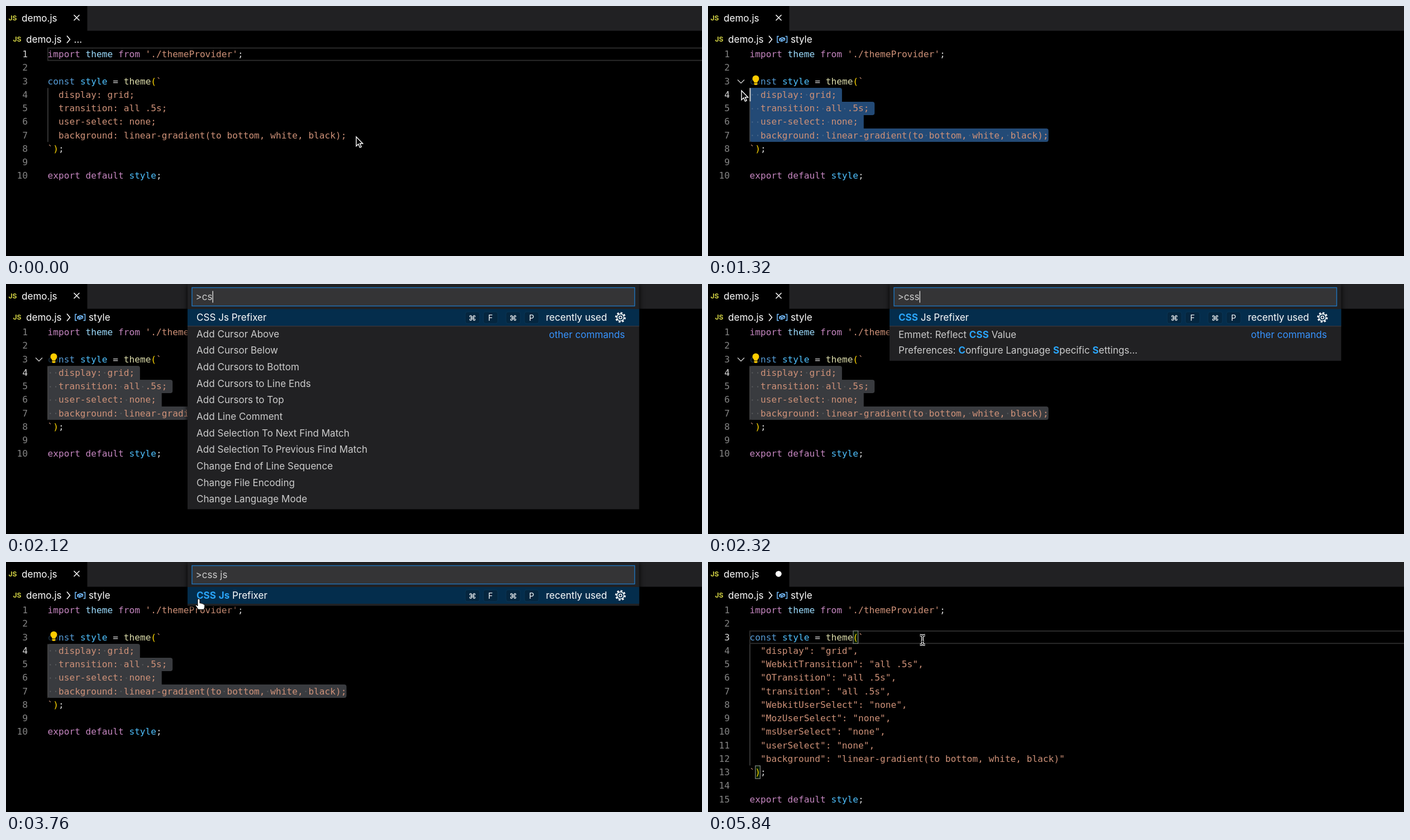
Recreate the animation shown at these times as an HTML page. Size 1246 by 449 pixels, loop 5920 ms.

```html
<!DOCTYPE html>
<html lang="en">
<head>
<meta charset="utf-8">
<title>CSS to JS prefixer demo</title>
<style>
html, body { margin: 0; width: 100%; height: 100%; overflow: hidden; background: #000; }
svg { display: block; width: 100%; height: 100%; }
text { white-space: pre; font: 17.07px Inter, sans-serif; fill: #ccc; }
.code text { font: 16.16px "DejaVu Sans Mono", monospace; fill: #d4d4d4; }
.code .k { fill: #c586c0; }
.code .v { fill: #9cdcfe; }
.code .s { fill: #ce9178; }
.code .c { fill: #569cd6; }
.code .n { fill: #4fc1ff; }
.code .f { fill: #dcdcaa; }
.code .b { fill: #ffd700; }
.code .num { fill: #858585; text-anchor: end; }
.code .num.on { fill: #d8d8d8; }
.w { fill: #fff; }
text.js { font-size: 12.2px; font-weight: 700; fill: #cbcb41; }
.hit { fill: #2aa4f8; font-weight: 700; }
.end { text-anchor: end; }
.key { font-size: 14px; text-anchor: middle; fill: #fff; }
.line { fill: none; stroke: #fff; stroke-width: 1.5; }
#popup { filter: drop-shadow(0 2px 5px #000); }
</style>
</head>
<body>
<svg viewBox="0 0 1246 449">
  <rect width="1246" height="449"/>
  <rect x="145.5" width="1101" height="44.5" fill="#212123"/>
  <text class="js" x="4.5" y="26">JS</text>
  <text class="w" x="28" y="27.5">demo.js</text>
  <path id="close" class="line" d="M121.5 16l10 10m0-10l-10 10"/>
  <circle id="dirty" class="w" cx="126.3" cy="21.3" r="5.4"/>
  <text class="js" x="12.5" y="64">JS</text>
  <text class="w" x="36" y="65.8">demo.js</text>
  <path class="line" d="M109 53.5l5.5 6.5-5.5 6.5" stroke-width="1.4"/>
  <text id="dots" class="w" x="121.5" y="65.8">...</text>
  <g id="crumb">
    <path class="line" style="stroke:#75beff" d="M127 54.5h-3v11h3M138.5 54.5h3v11h-3M128 59l5.5-2.5 4 1.5v3l-5.5 2.5-4-1.5zl4 1.5 5.5-2.5M132 60.5v3"/>
    <text class="w" x="148" y="65.8">style</text>
  </g>
  <g class="code">
    <rect id="current" x="75" width="1180" height="22.2" fill="none" stroke="#2a2a2a" stroke-width="2"/>
    <path id="selection"/>
    <path id="guide" stroke="#484848" stroke-width="1.4"/>
    <path id="spaces" fill="#e3e4e2" opacity=".2"/>
    <g id="brackets" fill="#001a00" stroke="#888" stroke-width="1.2">
      <rect x="260" y="123.8" width="8.6" height="22.6"/>
      <rect x="84.8" y="366" width="8.6" height="23"/>
    </g>
    <g id="before"></g>
    <g id="after"></g>
    <g id="numbers"></g>
  </g>
  <path id="fold" class="line" style="stroke:#c5c5c5" d="M53 132.5l6 6 6-6"/>
  <g id="bulb">
    <rect x="75" y="124" width="20" height="22" opacity=".7"/>
    <path fill="#fc0" d="M82.5 137.5q0-2-1.8-3.4a6 6 0 1 1 9.6 0q-1.8 1.4-1.8 3.4zM82.5 138.5h6v1.8q0 1.4-1.4 1.4h-3.2q-1.4 0-1.4-1.4z"/>
  </g>
  <rect id="caret" width="2" height="24" fill="#c8c8c6"/>
  <g id="popup">
    <rect id="panel" x="325" width="808.5" fill="#212123"/>
    <rect x="333" y="6.5" width="792.5" height="33" fill="#343436" stroke="#1f74bd" stroke-width="1.4"/>
    <text id="hint" x="339.5" y="29" style="fill:#a0a0a0">Search files by name (append : to go to line or @ to go to symbol)</text>
    <text id="query" x="339.5" y="29"></text>
    <rect id="inputCaret" y="12.5" width="1.4" height="21" fill="#ddd"/>
    <rect x="325" y="45" width="808.5" height="30" fill="#042d4c"/>
    <g id="files">
      <text class="js" x="346.5" y="64">JS</text><text class="w" x="370.5" y="66.2">demo.js</text>
      <text class="w end" x="1043" y="66.2">recently opened</text>
      <path class="line" d="M1060 52h16.5v15.5h-16.5zM1068.2 52v15.5M1095 55l10 10m0-10l-10 10"/>
      <text class="js" x="346.5" y="94">JS</text><text x="370.5" y="95.8">test.js</text>
      <text class="js" x="346" y="124" style="font-size:14px">{ }</text><text x="370.5" y="125.5">settings.json</text>
      <text x="482.5" y="125.5" style="font-size:15px;fill:#999">.vscode</text>
    </g>
    <g id="recent">
      <text class="w end" x="1076" y="66.2">recently used</text>
      <circle class="line" cx="1100" cy="60" r="6.3"/>
      <circle class="line" cx="1100" cy="60" r="2.6"/>
      <circle class="line" cx="1100" cy="60" r="8.2" style="stroke-width:2.6" stroke-dasharray="3.22"/>
    </g>
    <g id="other">
      <path d="M325 75.8h808.5" stroke="#3f3f46"/>
      <text class="end" x="1108" y="96.8" style="fill:#3794ff">other commands</text>
    </g>
    <g id="all"></g>
    <g id="css"></g>
    <g id="cssJs"></g>
  </g>
  <g id="mouse">
    <path id="arrow" d="M0 0V16.5l3.8-3.6 2.7 6.2 2.7-1.2-2.7-5.9h5.2z" stroke="#fff" stroke-width="1.4"/>
    <path id="hand" fill="#fff" stroke="#000" d="M-2 1a2 2 0 0 1 4 0v6q2.6-1 3.4.8 2.4-.7 3 1.1 2.4-.2 2.4 1.9v2q0 3-1.8 5.5H-1q-1-2.5-4.5-6.5-.6-2 1.3-1.8L-2 12z"/>
    <g id="beam" fill="none">
      <path stroke="#fff" stroke-width="4"/>
      <path stroke="#000" stroke-width="1.5"/>
    </g>
  </g>
</svg>
<script>
const LOOP = 5920, TICK = 40;
const LEFT = 74.5, TOP = 74.5, CHAR = 9.728, ROW = 24.25, ITEM = 29.63;
const CLICK = 160, SELECTED = 880, OPEN = 1600, RUN = 4280, REPLACED = 4320, DESELECT = 5000;

const $ = id => document.getElementById(id);
const show = (id, on) => { $(id).style.display = on ? '' : 'none'; };
const set = (id, attrs) => { for (const k in attrs) $(id).setAttribute(k, attrs[k]); };
const rowTop = row => TOP + row * ROW;
const colX = col => LEFT + col * CHAR;

const HEAD = [
  [['k', 'import '], ['v', 'theme '], ['k', 'from '], ['s', "'./themeProvider'"], ['', ';']],
  [],
  [['c', 'const '], ['n', 'style '], ['', '= '], ['f', 'theme'], ['b', '('], ['s', '`']]
];
const TAIL = [
  [['s', '`'], ['b', ')'], ['', ';']],
  [],
  [['k', 'export default '], ['n', 'style'], ['', ';']]
];
const withBody = body => [...HEAD, ...body.map(line => [['s', '  ' + line]]), ...TAIL];

const DOCS = {
  before: withBody([
    'display: grid;',
    'transition: all .5s;',
    'user-select: none;',
    'background: linear-gradient(to bottom, white, black);'
  ]),
  after: withBody([
    '"display": "grid",',
    '"WebkitTransition": "all .5s",',
    '"OTransition": "all .5s",',
    '"transition": "all .5s",',
    '"WebkitUserSelect": "none",',
    '"MozUserSelect": "none",',
    '"msUserSelect": "none",',
    '"userSelect": "none",',
    '"background": "linear-gradient(to bottom, white, black)"'
  ])
};
const plain = line => line.map(part => part[1]).join('');

for (const id in DOCS) {
  $(id).innerHTML = DOCS[id].map((line, i) =>
    `<text x="${LEFT}" y="${rowTop(i) + 17.7}">` +
    line.map(([cls, s]) => `<tspan class="${cls}">${s}</tspan>`).join('') + '</text>').join('');
}
$('numbers').innerHTML = DOCS.after.map((_, i) =>
  `<text class="num" x="39" y="${rowTop(i) + 17.7}">${i + 1}</text>`).join('');

// Square brackets mark the matched letters of a command.
const commands = (list, nudge = 0) => list.map((name, i) =>
  `<text class="${i ? '' : 'w'}" x="341" y="${66.2 + i * ITEM + (i === 1 ? nudge : 0)}">` +
  name.replace(/\[(.*?)\]/g, '<tspan class="hit">$1</tspan>') + '</text>').join('');
$('all').innerHTML = commands(['CSS Js Prefixer', 'Add Cursor Above', 'Add Cursor Below',
  'Add Cursors to Bottom', 'Add Cursors to Line Ends', 'Add Cursors to Top', 'Add Line Comment',
  'Add Selection To Next Find Match', 'Add Selection To Previous Find Match',
  'Change End of Line Sequence', 'Change File Encoding', 'Change Language Mode']);
$('css').innerHTML = commands(['[CSS] Js Prefixer', 'Emmet: Reflect [CSS] Value',
  'Preferences: [C]onfigure Language [S]pecific [S]ettings...'], 1);
$('cssJs').innerHTML = commands(['[CSS] [Js] Prefixer']);
$('recent').innerHTML += [[835, '⌘'], [867.5, 'F'], [908, '⌘'], [941, 'P']].map(([x, s]) =>
  `<rect x="${x - 13}" y="50" width="26" height="21" rx="4" fill="#05263f" stroke="#0a3554"/>` +
  `<text class="key" x="${x}" y="66">${s}</text>`).join('');
for (const path of $('beam').children) {
  path.setAttribute('d', 'M-4.5-8.5q3.7 0 4.5 2 .8-2 4.5-2M0-6.5v13M-4.5 8.5q3.7 0 4.5-2 .8 2 4.5 2M-2.5 2.5h5');
}

const MOUSE = [
  [0, 627, 235], [CLICK, 627, 235], [680, 143, 164], [SELECTED, 60, 152], [3160, 60, 152],
  [3640, 345, 67], [4360, 345, 67], [4560, 384, 122], [4640, 384, 122], [4840, 384, 140], [LOOP, 384, 140]
];
const TYPING = [
  [OPEN, ''], [1800, '>'], [1920, '>c'], [2040, '>cs'], [2160, '>css'],
  [2520, '>css '], [2640, '>css j'], [2800, '>css js']
];

function mouseAt(t) {
  const i = MOUSE.findIndex(step => step[0] > t);
  const [t0, x0, y0] = MOUSE[i - 1], [t1, x1, y1] = MOUSE[i];
  const u = (t - t0) / (t1 - t0), e = u * u * (3 - 2 * u);
  return [x0 + (x1 - x0) * e, y0 + (y1 - y0) * e];
}

const blink = age => age % 1000 < 500;

function cursorAt(t, doc, [x, y]) {
  if (t < CLICK) return [0, 0];
  if (t >= DESELECT) return [2, 21];
  if (t >= SELECTED) return [3, 0];
  const row = Math.floor((y - TOP) / ROW);
  const col = Math.round((x - LEFT) / CHAR);
  return [row, Math.max(0, Math.min(col, plain(doc[row]).length))];
}

function drawSelection(doc, [row, col], last) {
  const rows = [];
  for (let i = row; i <= last; i++) {
    const from = i === row ? col : 0, text = plain(doc[i]);
    rows.push({ from, text, to: text.length + (i < last ? 1 : 0), y: Math.round(rowTop(i)), end: Math.round(rowTop(i + 1)) });
  }
  let shape = '', dots = '';
  rows.forEach((r, i) => {
    const up = rows[i - 1], down = rows[i + 1], x = colX(r.from), x2 = colX(r.to);
    if (x2 <= x) return;
    const tl = !up || up.from > r.from ? 4 : 0, bl = down ? 0 : 4;
    const tr = !up || up.to < r.to ? 4 : 0, br = !down || down.to < r.to ? 4 : 0;
    shape += `M${x + tl} ${r.y}H${x2 - tr}q${tr} 0 ${tr} ${tr}V${r.end - br}q0 ${br} ${-br} ${br}` +
      `H${x + bl}q${-bl} 0 ${-bl} ${-bl}V${r.y + tl}q0 ${-tl} ${tl} ${-tl}z`;
    [...r.text].forEach((ch, c) => {
      if (ch === ' ' && c >= r.from) dots += `M${colX(c + .5) - 1} ${r.y + 11.5}h2v2h-2z`;
    });
  });
  set('selection', { d: shape });
  set('spaces', { d: dots });
}

function drawEditor(t, mouse) {
  const replaced = t >= REPLACED;
  const doc = replaced ? DOCS.after : DOCS.before;
  const last = doc.length - 4;
  const cursor = cursorAt(t, doc, mouse), [row, col] = cursor;
  const selecting = t >= CLICK && t < DESELECT && !(row === last && col === plain(doc[last]).length);

  show('before', !replaced);
  show('after', replaced);
  show('close', !replaced);
  show('dirty', replaced);
  show('dots', t < 640);
  show('crumb', t >= 640);
  show('fold', t >= 800 && t < 3440);
  show('bulb', t >= 1000 && t < DESELECT);
  show('brackets', t >= DESELECT);
  show('current', !selecting);
  show('selection', selecting);
  show('spaces', selecting);

  if (selecting) drawSelection(doc, cursor, last);
  set('selection', { fill: t < OPEN ? '#234a76' : '#393b3f' });
  set('current', { y: rowTop(row) + 1 });
  set('guide', { d: `M75 ${rowTop(3)}V${rowTop(last + 1)}` });
  [...$('numbers').children].forEach((num, i) => {
    num.style.display = i < doc.length ? '' : 'none';
    num.classList.toggle('on', i === row);
  });

  const focused = t >= CLICK && t < OPEN || t >= DESELECT;
  const moved = t >= DESELECT ? DESELECT : t >= SELECTED ? SELECTED : t;
  show('caret', focused && blink(t - moved));
  set('caret', { x: colX(col) + (col ? .5 : 0), y: rowTop(row) });
}

function drawPopup(t) {
  const open = t >= OPEN && t < RUN;
  show('popup', open);
  if (!open) return;
  const [typed, query] = TYPING.filter(step => step[0] <= t).pop();
  const view = !query ? 'files' : t < 2160 ? 'all' : t < 2640 ? 'css' : 'cssJs';
  const items = { files: 3, all: 12, css: 3, cssJs: 1 }[view];
  for (const id of ['files', 'all', 'css', 'cssJs']) show(id, id === view);
  show('recent', view !== 'files');
  show('other', view === 'all' || view === 'css');
  show('hint', !query);
  set('panel', { height: 49 + items * ITEM });
  $('query').textContent = query;
  show('inputCaret', blink(t - typed));
  set('inputCaret', { x: 339.5 + (query ? $('query').getComputedTextLength() : 0) });
}

function drawMouse(t, [x, y]) {
  const hand = t >= 3160 && t < RUN && x > 325 && y < 78;
  const beam = t >= RUN;
  show('mouse', t < OPEN || t >= 3160);
  show('hand', hand);
  show('beam', beam);
  show('arrow', !hand && !beam);
  set('mouse', { transform: `translate(${x} ${y})` });
}

let start, drawn;
function frame() {
  const now = performance.now();
  start ??= now;
  const t = Math.floor((now - start) % LOOP / TICK) * TICK;
  if (t !== drawn) {
    const mouse = mouseAt(t);
    drawEditor(t, mouse);
    drawPopup(t);
    drawMouse(t, mouse);
    drawn = t;
  }
  requestAnimationFrame(frame);
}
frame();
</script>
</body>
</html>
```
